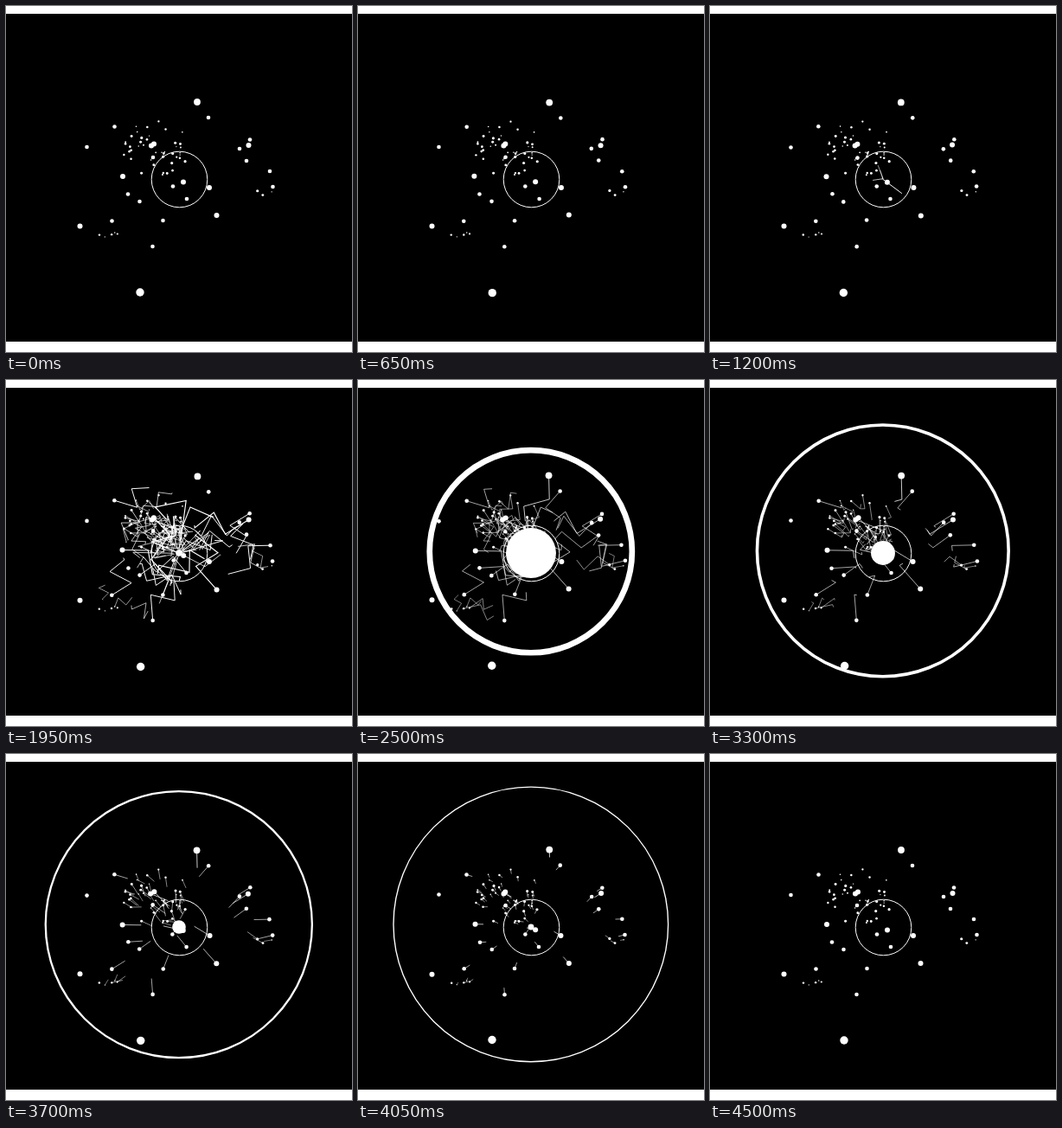
Write an HTML page with a canvas that moves like this. It is 400x400 px and loops after 4550 ms.

```html
<!DOCTYPE html>
<html lang="en">
<head>
<meta charset="utf-8">
<title>Star burst</title>
<style>
  html, body { margin: 0; width: 100%; height: 100%; overflow: hidden; background: #fff; }
  canvas { display: block; width: 400px; height: 400px; }
</style>
</head>
<body>
<canvas id="stage" width="400" height="400"></canvas>
<script>
const LOOP = 4550, STEP = 50, IGNITE = 1800, BURST = 2250, END = 4500;
const CX = 200, CY = 200, TAU = Math.PI * 2;
const ctx = document.getElementById('stage').getContext('2d');

let seed = 29;
const rnd = () => (seed = (seed * 16807) % 2147483647) / 2147483647;
const between = (a, b) => a + (b - a) * rnd();
const clamp = v => Math.max(0, Math.min(1, v));

// The bright stars, as x, y pairs by radius; swarms fill in the faint ones.
const bright = {
  4.7: [155, 331],
  3.9: [221, 111],
  3: [168, 161.5, 171, 159.5, 280.5, 161, 205, 203.5, 85.5, 254.5, 135, 197, 235, 210, 243.5, 242],
  2.3: [282, 154.5, 270, 165, 278, 179, 170, 175, 141, 217.5, 308.5, 209, 305, 191, 125.5, 139.5,
        93.5, 163, 234, 129, 209, 223, 193, 208.5, 181.5, 248, 154.5, 226, 169.5, 278, 122.5, 248.5]
};
const swarms = [
  { x: 172, y: 165, rx: 40, ry: 32, n: 46 },
  { x: 127, y: 265, rx: 22, ry: 5, n: 5 },
  { x: 302, y: 213, rx: 12, ry: 7, n: 3 }
];

// A jagged walk that leaves the star inwards, then one leg to the centre.
function makeBolt(x, y, r) {
  const path = new Path2D();
  const leg = 8 + 8 * Math.min(r, 3);
  let heading = Math.atan2(CY - y, CX - x) + between(-0.5, 0.5);
  let side = rnd() < 0.5 ? 1 : -1, walk = 0;
  path.moveTo(x, y);
  for (let i = 0; i < 4; i++) {
    const d = leg * between(0.75, 1.15);
    x += d * Math.cos(heading);
    y += d * Math.sin(heading);
    path.lineTo(x, y);
    walk += d;
    heading += side * between(1.3, 2.2);
    side = -side;
  }
  path.lineTo(CX, CY);
  return { path, walk, total: walk + Math.hypot(x - CX, y - CY) };
}

const stars = [];
function addStar(x, y, r) {
  stars.push({
    x, y, r, ...makeBolt(x, y, r),
    reached: Math.hypot(x - CX, y - CY) < 110,
    start: between(1120, 1800),
    fx: Math.floor(between(4, 11)), fy: Math.floor(between(4, 11)),
    ax: between(-0.3, 0.3) * r, ay: between(-0.3, 0.3) * r
  });
}

for (const [r, xy] of Object.entries(bright)) {
  for (let i = 0; i < xy.length; i += 2) addStar(xy[i], xy[i + 1], +r);
}
for (const { x, y, rx, ry, n } of swarms) {
  for (let i = 0; i < n; i++) {
    const a = rnd() * TAU, d = Math.sqrt(rnd());
    addStar(x + rx * d * Math.cos(a), y + ry * d * Math.sin(a), between(0.6, 1.6));
  }
}

function disc(x, y, r) {
  ctx.beginPath();
  ctx.arc(x, y, r, 0, TAU);
  ctx.fill();
}

function ring(x, y, r, width) {
  ctx.lineWidth = width;
  ctx.beginPath();
  ctx.arc(x, y, r, 0, TAU);
  ctx.stroke();
}

// The streak flies out from the centre, then shrinks onto its star.
function drawBolt(s, t, shrink) {
  const near = s.total * (1 - clamp((t - s.start) / 450));
  const far = Math.min(s.total, near + 0.75 * s.walk * shrink);
  if (!s.reached || far <= near) return;
  ctx.lineWidth = t < BURST ? 0.4 + 0.25 * s.r : 0.4 + 0.1 * s.r;
  ctx.setLineDash([far - near, s.total * 2]);
  ctx.lineDashOffset = -near;
  ctx.stroke(s.path);
}

function draw(t) {
  const q = clamp((END - t) / (END - BURST));
  const shrink = q ** 1.43;

  ctx.fillStyle = '#fff';
  ctx.fillRect(0, 0, 400, 400);
  ctx.fillStyle = '#000';
  ctx.fillRect(0, 9, 400, 379);
  ctx.fillStyle = ctx.strokeStyle = '#fff';

  const phase = TAU * clamp(t / END);
  for (const s of stars) {
    ctx.save();
    ctx.translate(s.ax * Math.sin(phase * s.fx), s.ay * Math.sin(phase * s.fy));
    drawBolt(s, t, shrink);
    disc(s.x, s.y, s.r);
    ctx.restore();
  }

  ring(200.5, 200.5, 32.3, 1);

  const core = 34.3 * shrink * clamp((t - IGNITE) / (BURST - IGNITE)) ** 2;
  if (core > 0) disc(CX, CY, core);

  if (t >= 2200 && q > 0) {
    const r = 161 - 55 * q ** 2 - 75 * Math.exp((2200 - t) / 60);
    ring(CX - 0.2, CY - 0.2 - 3 * (r / 162) ** 2, r, 0.6 + 7.2 * q ** 1.4);
  }
}

const origin = performance.now();
function tick(now) {
  const t = Math.max(0, now - origin) % LOOP;
  draw(Math.floor(t / STEP) * STEP);
  requestAnimationFrame(tick);
}
draw(0);
requestAnimationFrame(tick);
</script>
</body>
</html>
```
